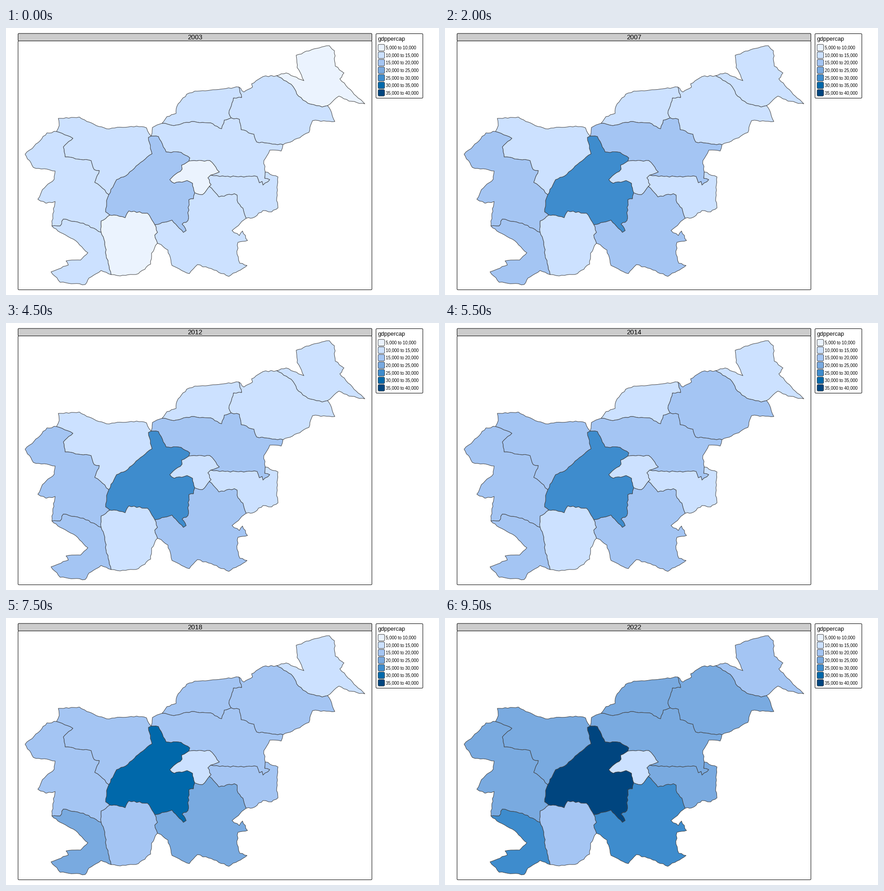
These frames come from a looping animation (952 px wide and 588 px high, 10000 ms). A matplotlib script:

```python
import math
import random

import matplotlib.pyplot as plt
from matplotlib.animation import FuncAnimation
from matplotlib.patches import FancyBboxPatch, Polygon

W, H, DPI = 952, 588, 64
PX = 72 / DPI  # points per pixel
COLORS = ["#EBF3FE", "#CCE1FF", "#A4C5F3", "#79AAE0", "#3E8CCD", "#0068AA", "#00457F"]
EDGE = "#404040"
FIRST_YEAR, YEARS = 2003, 20
STEP, WOBBLE = 6, 1.3  # spacing and depth of the small bends in a border

rng = random.Random(4)


def border(*corners):
    """Join key corners with a finely wobbling line."""
    line = [corners[0]]
    for (x0, y0), (x1, y1) in zip(corners, corners[1:]):
        length = math.hypot(x1 - x0, y1 - y0)
        steps = max(1, round(length / STEP))
        for i in range(1, steps):
            t, offset = i / steps, rng.uniform(-WOBBLE, WOBBLE) / length
            line.append((x0 + t * (x1 - x0) - offset * (y1 - y0),
                         y0 + t * (y1 - y0) + offset * (x1 - x0)))
        line.append((x1, y1))
    return line


def ring(*borders):
    """Join borders end to end, flipping those that run backwards."""
    first, second = borders[:2]
    path = list(first if first[-1] in (second[0], second[-1]) else first[::-1])
    for line in borders[1:]:
        path += line if line[0] == path[-1] else line[::-1]
    return path


# Points where borders meet
A, B, C, D, E, F, G = (111, 228), (226, 367), (319, 238), (343, 210), (402, 293), (415, 363), (450, 324)
I, J, K, L, M, N, O = (447, 349), (570, 317), (528, 419), (333, 474), (327, 433), (228, 412), (209, 450)
P, Q, R, S, T, U, V = (231, 543), (101, 436), (512, 130), (495, 198), (595, 105), (707, 171), (609, 257)

# Inner borders
gr_go = border(A, (147, 243), (126, 262), (130, 284), (187, 292), (194, 312), (205, 314),
               (195, 340), (207, 348), B)
go_os = border(C, (313, 241), (321, 277), (286, 304), (268, 322), (243, 334), B)
os_sa = border(C, (335, 239), (352, 273), (385, 274), (404, 286), E)
os_za = border(E, (386, 302), (387, 311), (360, 334), (370, 342), (398, 336), (410, 342), F)
za_sa = border(E, (448, 292), (469, 317), G)
za_sp = border(G, (444, 330), (451, 345), I)
za_jv = border(I, (432, 367), F)
sp_sa = border(G, (470, 327), (552, 327), (557, 341), (563, 338), (565, 346), (580, 334),
               (569, 331), J)
sp_jv = border(I, (468, 372), (502, 365), (508, 368), (510, 385), (521, 397), K)
jv_pn = border(L, (327, 456), (333, 450), M)
jv_os = border(M, (365, 423), (390, 450), (396, 446), (387, 432), (400, 424), (402, 378),
               (412, 376), F)
os_pn = border(M, (311, 408), (270, 403), (262, 418), (237, 412), N)
os_gr = border(N, (219, 405), (221, 380), B)
gr_pn = border(N, (209, 425), O)
pn_ob = border(O, (217, 471), (220, 500), P)
ob_gr = border(Q, (119, 436), (126, 421), (170, 430), O)
ko_pd = border(R, (518, 153), (500, 154), (490, 188), S)
ko_sa = border(D, (369, 215), (408, 206), (450, 209), (474, 222), (480, 203), S)
pm_pd = border(T, (627, 124), (643, 150), (664, 166), (695, 174), U)
pd_sa = border(S, (513, 201), (517, 224), (545, 234), (551, 251), V)

# Outer borders
go_out = border(A, (117, 215), (115, 199), (161, 196), (178, 206), (221, 222), (287, 216),
                (309, 220), C)
sa_north = border(C, (322, 219), D)
sa_east = border(V, (605, 271), (580, 269), (567, 292), J)
ko_out = border(D, (354, 195), (374, 188), (376, 172), (397, 146), (415, 139), (478, 134), R)
pd_north = border(R, (523, 141), (542, 130), (540, 123), (565, 107), T)
pd_south = border(U, (716, 187), (723, 206), (674, 204), (666, 230), (630, 249), V)
pm_out = border(T, (616, 99), (655, 116), (640, 87), (638, 60), (677, 46), (711, 39),
                (722, 50), (724, 84), (743, 99), (734, 112), (752, 132), (789, 167),
                (754, 161), (732, 150), U)
sp_out = border(J, (598, 328), (595, 380), (598, 396), (584, 405), (565, 402), (543, 418), K)
jv_out = border(K, (497, 446), (513, 457), (520, 447), (531, 468), (510, 472), (508, 498),
                (514, 518), (530, 523), (490, 547), (457, 533), (421, 521), (403, 541),
                (365, 523), (356, 489), (341, 477), L)
pn_out = border(P, (251, 546), (291, 541), (318, 520), (320, 496), L)
ob_out = border(P, (209, 534), (182, 551), (174, 565), (119, 560), (99, 537), (137, 522),
                (132, 513), (164, 511), (180, 495), (148, 465), (114, 447), Q)
gr_out = border(Q, (103, 409), (108, 382), (88, 386), (70, 377), (80, 356), (106, 333),
                (108, 315), (60, 307), (42, 278), (62, 260), (90, 231), A)

AREAS = {
    "pm": ring(pm_out, pm_pd),
    "pd": ring(pd_north, pm_pd, pd_south, pd_sa, ko_pd),
    "ko": ring(ko_out, ko_pd, ko_sa),
    "sa": ring(sa_north, ko_sa, pd_sa, sa_east, sp_sa, za_sa, os_sa),
    "za": ring(za_sa, za_sp, za_jv, os_za),
    "sp": ring(sp_sa, sp_out, sp_jv, za_sp),
    "jv": ring(sp_jv, jv_out, jv_pn, jv_os, za_jv),
    "os": ring(os_sa, os_za, jv_os, os_pn, os_gr, go_os),
    "go": ring(go_out, go_os, gr_go),
    "pn": ring(os_pn, gr_pn, pn_ob, pn_out, jv_pn),
    "gr": ring(gr_out, gr_go, os_gr, gr_pn, ob_gr),
    "ob": ring(ob_gr, pn_ob, ob_out),
}

# Classes start at 1 unless given; each year listed moves an area up one class
START = dict(pm=0, pn=0, za=0, os=2)
RISES = dict(
    pm=(2006, 2019), pd=(2008, 2014, 2021), ko=(2016, 2022), sa=(2007, 2019, 2021),
    za=(2006,), sp=(2017, 2022), jv=(2006, 2017, 2022), os=(2005, 2007, 2018, 2021),
    go=(2008, 2013, 2019, 2021), pn=(2004, 2017), gr=(2007, 2019, 2021),
    ob=(2005, 2008, 2017, 2022),
)
FALLS = {2009: ("ob", "pd", "go"), 2020: ("gr", "sa", "go")}


def value_class(name, year):
    rises = sum(y <= year for y in RISES[name])
    falls = sum(y <= year and name in names for y, names in FALLS.items())
    return START.get(name, 1) + rises - falls


plt.rcParams["font.family"] = "Liberation Sans"
fig = plt.figure(figsize=(W / DPI, H / DPI), dpi=DPI, facecolor="white")
ax = fig.add_axes([0, 0, 1, 1])
ax.set(xlim=(0, W), ylim=(H, 0))
ax.axis("off")


def box(x0, y0, x1, y1, fill, edge="black", radius=2):
    ax.add_patch(FancyBboxPatch(
        (x0, y0), x1 - x0, y1 - y0, boxstyle=f"round,pad=0,rounding_size={radius}",
        fc=fill, ec=edge, lw=PX))


def label(x, y, text, size, **kwargs):
    return ax.text(x, y, text, fontsize=size * PX, va="baseline", **kwargs)


box(26.5, 28.5, 804.5, 576.5, "white")
box(26.5, 12, 804.5, 28.5, "#CCCCCC")
year_text = label(415.3, 25.4, "", 14.6, ha="center")

box(813.5, 12.5, 916.5, 154.5, "white")
label(817.7, 28, "gdppercap", 12.7)
for i, color in enumerate(COLORS):
    y = 43.3 + 16.58 * i
    box(818, y - 7.2, 832.4, y + 7.2, color, EDGE, 2.5)
    label(835, y + 3.4, f"{5 + 5 * i},000 to {10 + 5 * i},000", 9.6)

patches = {
    name: ax.add_patch(Polygon(path, closed=True, ec=EDGE, lw=PX, joinstyle="round"))
    for name, path in AREAS.items()
}


def update(frame):
    year = FIRST_YEAR + frame
    for name, patch in patches.items():
        patch.set_facecolor(COLORS[value_class(name, year)])
    year_text.set_text(str(year))
    return [*patches.values(), year_text]


anim = FuncAnimation(fig, update, frames=YEARS, interval=500, repeat=True)
plt.show()
```
